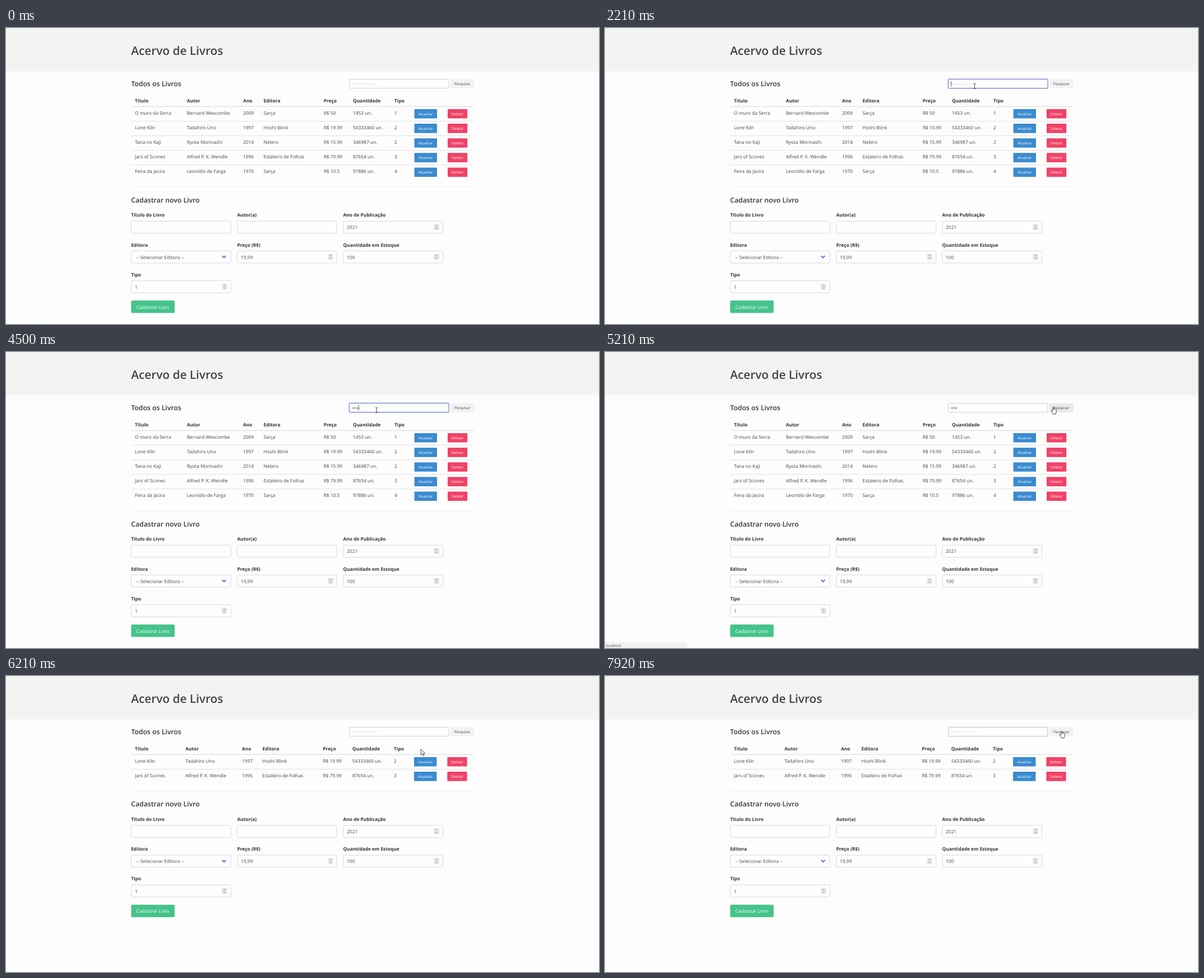
Recreate the animation shown at these times as an HTML page. Size 1058 px wide and 529 px high, loop 8000 ms.

```html
<!DOCTYPE html>
<html lang="pt-BR">
<head>
<meta charset="utf-8">
<title>Acervo de Livros</title>
<style>
  html, body { margin: 0; width: 100%; height: 100%; overflow: hidden; background: #fdfdfd; }
  svg { display: block; width: 1058px; height: 529px; }
  text { font: 8.37px "Open Sans", "Noto Sans", sans-serif; fill: #444; text-rendering: geometricPrecision; }
  .title { font-size: 20.8px; font-weight: 600; fill: #434343; }
  .sub { font-size: 12.26px; font-weight: 600; fill: #363636; }
  .bold { font-size: 8.35px; font-weight: 700; fill: #333; }
  .small { font-size: 6.3px; }
  .hint { font-size: 6.3px; fill: #dddde0; }
  .light { fill: #fff; }
  .mid { text-anchor: middle; }
  .box { fill: #fefefe; stroke: #d6d7e4; }
  .mark { fill: none; stroke: #777; stroke-width: .8; }
  .pointer path { fill: #fff; stroke: #222; stroke-width: .8; stroke-linejoin: round; }
  .pointer .beam { fill: none; stroke: #444; stroke-width: 1; }
</style>
</head>
<body>
<svg id="stage" viewBox="0 0 1058 529"></svg>
<script>
const LOOP = 8000;
const PITCH = 26.1;

const books = [
  ["O muro da Serra", "Bernard Wexcombe", 2009, "Sarça", "R$ 50", "1453 un.", 1],
  ["Lone Kiln", "Tadahiro Uno", 1997, "Hoshi Blink", "R$ 19.99", "54333460 un.", 2],
  ["Tana no Kaji", "Ryota Morinashi", 2014, "Nebiro", "R$ 15.99", "346987 un.", 2],
  ["Jars of Scones", "Alfred P. K. Wendle", 1996, "Estaleiro de Folhas", "R$ 79.99", "87654 un.", 3],
  ["Feira da Jacira", "Leonídio de Farga", 1970, "Sarça", "R$ 10.5", "97886 un.", 4]
];
const heads = ["Título", "Autor", "Ano", "Editora", "Preço", "Quantidade", "Tipo"];
const allCols = [230, 322.7, 423, 459.5, 566.7, 619, 693];
const foundCols = [230, 320.2, 421, 457.5, 565.3, 617.8, 692];

const text = (x, y, s, cls = "") => `<text x="${x}" y="${y}" class="${cls}">${s}</text>`;
const rect = (x, y, w, h, fill, r = 0) =>
  `<rect x="${x}" y="${y}" width="${w}" height="${h}" rx="${r}" fill="${fill}"/>`;
const rule = (y, fill) => rect(223.5, y, 612, 1, fill);
const button = (x, y, w, fill, label) =>
  rect(x, y, w, 16.6, fill, 1) + text(x + w / 2, y + 10.8, label, "small light mid");

function table(id, rows, cols, shift) {
  let out = heads.map((h, i) => text(cols[i], 133.2, h, "bold")).join("") + rule(139.7, "#d8d8d8");
  rows.forEach((row, r) => {
    const y = r * PITCH;
    out += row.map((v, i) => text(cols[i], 154.5 + y, v)).join("");
    out += button(728.6 - shift, 145 + y, 40.4, "#3a8bcf", "Atualizar");
    out += button(788 - shift, 145 + y, 35.2, "#f04267", "Deletar");
    if (r < rows.length - 1) out += rule(166 + y, "#e0e0e0");
  });
  return `<g id="${id}">${out}</g>`;
}

function field(x, y, label, value, spin) {
  let out = text(x, y - 7.7, label, "bold") +
    `<rect class="box" x="${x + .3}" y="${y + .2}" width="177.6" height="21.6" rx="2"/>` +
    text(x + 6.5, y + 14.4, value);
  if (spin) {
    out += rect(x + 161.8, y + 5.2, 9.6, 11, "#e7e7e7", 1) +
      `<path class="mark" d="M${x + 164.7} ${y + 9.5}l1.9-2 1.9 2m-3.8 2.6l1.9 2 1.9-2"/>`;
  }
  return out;
}

const form = rule(283.7, "#efefef") +
  text(223.2, 311.6, "Cadastrar novo Livro", "sub") +
  field(223.2, 345, "Título do Livro", "") +
  field(412.5, 345, "Autor(a)", "") +
  field(601.6, 345, "Ano de Publicação", "2021", true) +
  field(223.2, 398.2, "Editora", "") +
  text(232.2, 412.6, "-- Selecionar Editora --") +
  `<path d="M385.6 407.2l3.4 3.4 3.4-3.4" fill="none" stroke="#485fc7" stroke-width="1.7"/>` +
  field(412.5, 398.2, "Preço (R$)", "19,99", true) +
  field(601.6, 398.2, "Quantidade em Estoque", "100", true) +
  field(223.2, 451.5, "Tipo", "1", true) +
  rect(223.3, 487, 77.6, 22.2, "#45c48a", 2) +
  text(262.1, 501.5, "Cadastrar Livro", "light mid");

const $ = id => document.getElementById(id);

$("stage").innerHTML =
  rect(0, 0, 1058, 529, "#fdfdfd") + rect(0, 0, 1058, 77.6, "#f3f3f2") +
  text(223.2, 47.8, "Acervo de Livros", "title") +
  text(223.2, 104.4, "Todos os Livros", "sub") +
  `<rect id="glow" x="611.6" y="90.6" width="179" height="18" rx="1.5" fill="none" stroke="#485fc7" stroke-opacity=".25"/>
   <rect id="search" x="612.6" y="91.6" width="177.4" height="16" rx="1" fill="#fefefe"/>` +
  text(617.3, 102, "Nome do Livro...", "hint").replace("<text", '<text id="hint"') +
  text(617.3, 102, "", "small").replace("<text", '<text id="typed"') +
  `<rect id="caret" y="95" width=".9" height="9.4" fill="#444"/>
   <rect id="find" x="793" y="91.4" width="42.6" height="16.6" rx="1"/>` +
  text(814.3, 102.2, "Pesquisar", "small mid") +
  table("all", books, allCols, 0) +
  table("found", books.filter(b => /one/i.test(b[0])), foundCols, .6) +
  `<g id="form">${form}</g>
   <g id="status">${rect(0, 518.4, 146.5, 11, "#f1f1f1", 1)}${text(2, 526.8, "localhost", "small")}</g>
   <g id="pointer" class="pointer">
     <path id="arrow" d="M0 0V10.4L2.4 8.2 4 11.8 5.6 11.1 4 7.6H7.3Z"/>
     <path id="beam" class="beam" d="M-2-4.5H-.6L0-4 .6-4.5H2M0-4V4M-2 4.5H-.6L0 4 .6 4.5H2"/>
     <path id="hand" d="M-.9.8Q0-.6.9.8V4.4Q2-.0 2.6 4.6 3.9 3.9 4.3 5.2 5.8 4.6 5.9 6.2V9.2L4.8 11.2V12.8H-.6V11.6L-3.4 7.6Q-3.6 6-2 6.6L-.9 7.8Z"/>
   </g>`;

// Pointer stops: time, x, y
const path = [
  [40, 1064, 176], [800, 659.5, 103], [2010, 659.5, 103], [2200, 659.5, 104],
  [3010, 659.5, 104], [3130, 661, 104], [4750, 661, 104], [5130, 799.5, 98],
  [5920, 799.5, 98], [6250, 738, 132], [6710, 672, 103], [6920, 672, 103],
  [7000, 677, 101.5], [7420, 677, 101.5], [7900, 814.5, 98]
];

function pointerAt(t) {
  const i = path.findIndex(p => p[0] > t);
  if (i <= 0) return (i ? path[path.length - 1] : path[0]).slice(1);
  const [a, b] = [path[i - 1], path[i]];
  const k = (t - a[0]) / (b[0] - a[0]);
  const e = k * k * (3 - 2 * k);
  return [a[1] + (b[1] - a[1]) * e, a[2] + (b[2] - a[2]) * e];
}

const within = (t, a, b) => t >= a && t < b;
const show = (id, on) => $(id).setAttribute("visibility", on ? "visible" : "hidden");

function render(t) {
  const [x, y] = pointerAt(t);
  const inRow = y > 91 && y < 108;
  const overField = inRow && x > 612 && x < 791;
  const overFind = inRow && x > 793 && x < 836;
  const focus = within(t, 1000, 5130);
  const loaded = t >= 5460;
  const typed = loaded ? "" : "one".slice(0, (t >= 3540) + (t >= 3790) + (t >= 4010));

  $("pointer").setAttribute("transform", `translate(${x} ${y})`);
  show("beam", overField);
  show("hand", overFind);
  show("arrow", !overField && !overFind);

  $("search").setAttribute("stroke", focus ? "#6c7bd1" : overField || t > 6700 ? "#b9bada" : "#cbcde4");
  show("glow", focus);
  $("find").setAttribute("fill", overFind && t < 7000 ? "#e9e9e9" : "#f2f2f2");
  $("typed").textContent = typed;
  show("hint", !typed);
  $("caret").setAttribute("x", typed ? 629 : 617.3);
  show("caret", within(t, 4010, 4510) || within(t, 1000, 3500) && t % 1000 < 500);

  show("status", within(t, 5170, 5460));
  show("all", !loaded);
  show("found", loaded);
  $("form").setAttribute("transform", `translate(0 ${loaded ? -3 * PITCH : 0})`);
}

const start = performance.now();
function tick() {
  render((performance.now() - start) % LOOP);
  requestAnimationFrame(tick);
}
tick();
</script>
</body>
</html>
```
